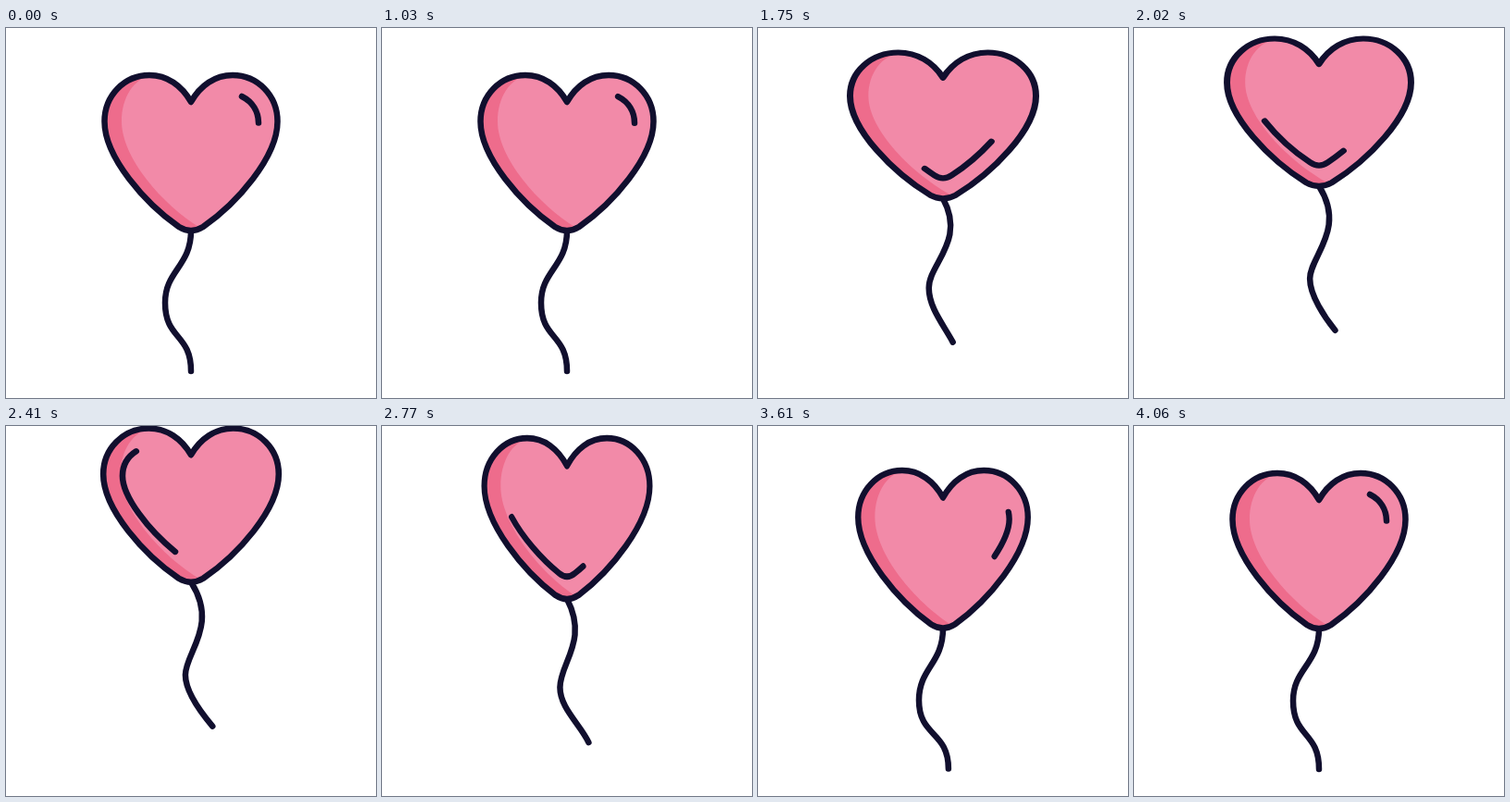
These frames come from a looping animation (400x400 px, 4090 ms). An HTML page:

```html
<!DOCTYPE html>
<html lang="en">
<head>
<meta charset="utf-8">
<title>Heart balloon</title>
<style>
html, body { margin: 0; height: 100%; overflow: hidden; background: #fff; }
svg { display: block; width: 100%; height: 100%; }
.line { fill: none; stroke: #110f2e; stroke-width: 6.5; stroke-linecap: round; stroke-linejoin: round; }
</style>
</head>
<body>
<svg viewBox="0 0 400 400">
  <path id="string" class="line"/>
  <g id="heart">
    <path id="fill" fill="#f28aa8"/>
    <path fill="#ee6c8c" d="M155 51C128 51 106.5 73 106.5 101C106.5 140 151 190 187 215Q196 221 210 216C169 191 125 140 125 101C125 75 138 55 157 51Z"/>
    <path id="outline" class="line"/>
    <path id="shine" class="line" pathLength="312" d="M255 74C267 80 273 91 273 103C273 128 240 169 209 192Q200 199 191 192C160 169 127 128 127 103C127 91 133 80 145 74"/>
  </g>
</svg>
<script>
const LOOP = 4090, START = 1030, END = 3830, TOP = 2330;
const CENTER = 134.5, HALF = 84.5;
const $ = id => document.getElementById(id);
const heartPath = 'M200 80C190 62 174 51 155 51C128 51 106.5 73 106.5 101C106.5 140 151 190 187 215Q200 223 213 215C249 190 293.5 140 293.5 101C293.5 73 272 51 245 51C226 51 210 62 200 80Z';
$('fill').setAttribute('d', heartPath);
$('outline').setAttribute('d', heartPath);

// Share of the span from a to b that has passed, 0 to 1
const part = (t, a, b) => Math.min(1, Math.max(0, (t - a) / (b - a)));
const ease = p => (1 - Math.cos(Math.PI * p)) / 2;
const arch = p => Math.sin(Math.PI * p);

// Height above rest: floats up, then sinks with an early drop
const rise = t => 50.5 * (t < TOP ? ease(part(t, START, TOP)) : 1 - ease(part(t, TOP, END) ** .8));

// Wide on the way up, narrow on the way down
const stretch = t => t < 2500
  ? .075 * arch(part(t, START, 2500))
  : -.051 * arch(part(t, 2500, END) ** .7);

// The sway runs down the string, so lower points follow later
function stringPath(t, tip) {
  const sway = delay => arch(part(t, START + delay, START + delay + 2400));
  const top = sway(0), mid = 172 + 22 * sway(250), end = 200 + 24 * sway(370);
  const points = [
    [200 + 31 * top, 39 + 8 * top],
    [mid, 43 + 34 * top],
    [mid, 78 + 23 * top],
    [mid, 118],
    [end - 12 * top, 111 + 32 * top],
    [end, 152 + 4 * top]
  ];
  return `M200 ${tip}C` + points.map(([x, y]) => `${x} ${y + tip}`).join(' ');
}

function draw(now) {
  const t = now % LOOP;
  const s = stretch(t), sx = 1 + s, sy = 1 - .8 * s, y = CENTER - rise(t);
  $('heart').setAttribute('transform', `translate(200 ${y}) scale(${sx} ${sy}) translate(-200 ${-CENTER})`);
  $('string').setAttribute('d', stringPath(t, y + HALF * sy));

  // The shine slides around the inner edge and back at constant speed
  const go = 1 - Math.abs(2 * part(t, START, END) - 1);
  const from = 178 * go, to = 35 + 277 * go;
  $('shine').setAttribute('stroke-dasharray', `${to - from} 400`);
  $('shine').setAttribute('stroke-dashoffset', -from);
}

function tick() {
  draw(performance.now());
  requestAnimationFrame(tick);
}
tick();
</script>
</body>
</html>
```
